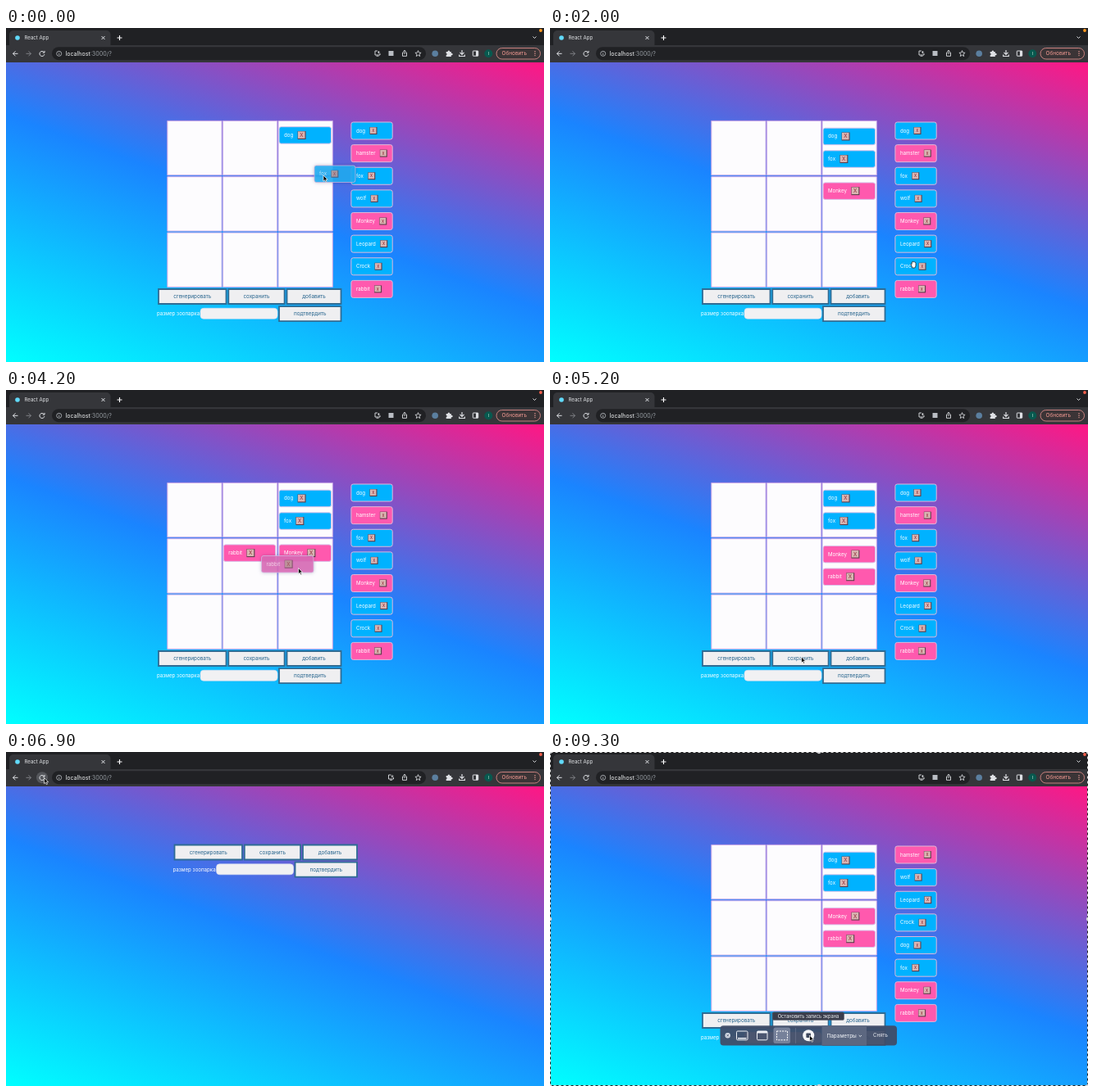
Write an HTML page with a canvas that moves like this. It is 656x408 px and loops after 9400 ms.

```html
<!DOCTYPE html>
<html lang="ru">
<head>
<meta charset="utf-8">
<title>React App</title>
<style>
  html, body { margin: 0; width: 100%; height: 100%; overflow: hidden; background: #1a84ff; }
  canvas { display: block; width: 656px; height: 408px; }
</style>
</head>
<body>
<canvas></canvas>
<script>
const W = 656, H = 408, LOOP = 9400, STEP = 100;
const canvas = document.querySelector('canvas');
const ctx = canvas.getContext('2d');
const dpr = window.devicePixelRatio || 1;
canvas.width = W * dpr;
canvas.height = H * dpr;
ctx.scale(dpr, dpr);

const BLUE = '#00b2ff', PINK = '#ff59ae', ICON = '#dfe1e5';
const pinkAnimals = ['hamster', 'Monkey', 'rabbit'];
const firstOrder = ['dog', 'hamster', 'fox', 'wolf', 'Monkey', 'Leopard', 'Crock', 'rabbit'];
const savedOrder = ['hamster', 'wolf', 'Leopard', 'Crock', 'dog', 'fox', 'Monkey', 'rabbit'];

// time, x, y, hand cursor
const path = [
  [0, 387, 180, 0], [500, 366, 158, 0], [700, 372, 165, 0],
  [1000, 441, 239, 1], [1200, 441, 239, 0], [1600, 368, 207, 0], [1700, 368, 207, 0],
  [2000, 443, 289, 1], [2200, 434, 321, 1], [2300, 420, 290, 0], [2400, 352, 180, 0],
  [2500, 352, 180, 0], [2900, 300, 206, 0], [3000, 298, 209, 1], [3200, 298, 209, 1],
  [3500, 337, 203, 0], [3700, 311, 203, 1], [3900, 316, 204, 0], [4300, 370, 222, 0],
  [4500, 370, 222, 0], [5100, 306.5, 326, 0], [5500, 306.5, 326, 0], [5700, 338, 260, 0],
  [6000, 291, 140, 0], [6100, 291, 140, 0], [6300, 29, 62, 0], [6500, 46.5, 31.5, 0],
  [7000, 46.5, 31.5, 0], [7400, 560, 170, 0], [8100, 560, 170, 0], [8500, 646, 116, 0],
  [8600, 646, 116, 0], [9200, 316.5, 346, 0], [LOOP, 316.5, 346, 0]
];

const drags = [
  { name: 'fox', from: 0, to: 600, dx: 11, dy: 12, w: 50 },
  { name: 'Monkey', from: 1200, to: 1700, dx: 21, dy: 14, w: 50 },
  { name: 'rabbit', from: 2300, to: 3000, dx: 14, dy: 14, w: 50 },
  { name: 'rabbit', from: 3900, to: 4400, dx: 45, dy: 15, w: 63.5 }
];

function box(x, y, w, h, r, fill, stroke, lineWidth = 1) {
  ctx.beginPath();
  ctx.roundRect(x, y, w, h, r);
  if (fill) { ctx.fillStyle = fill; ctx.fill(); }
  if (stroke) { ctx.strokeStyle = stroke; ctx.lineWidth = lineWidth; ctx.stroke(); }
}

function disc(x, y, r, fill) {
  ctx.beginPath();
  ctx.arc(x, y, r, 0, 7);
  ctx.fillStyle = fill;
  ctx.fill();
}

function text(str, x, y, size, color, align = 'left', weight = 400) {
  ctx.font = `${weight} ${size}px Inter, "Liberation Sans", sans-serif`;
  ctx.textAlign = align;
  ctx.textBaseline = 'middle';
  ctx.fillStyle = color;
  ctx.fillText(str, x, y);
}

// SVG path data drawn around a local origin
function glyph(x, y, d, color = ICON, lineWidth = 1, fill) {
  const shape = new Path2D(d);
  ctx.save();
  ctx.translate(x, y);
  if (fill) { ctx.fillStyle = fill; ctx.fill(shape); }
  if (color) { ctx.strokeStyle = color; ctx.lineWidth = lineWidth; ctx.stroke(shape); }
  ctx.restore();
}

function cursorAt(t) {
  const i = path.findIndex(p => p[0] > t);
  const a = path[i - 1], b = path[i];
  const k = (t - a[0]) / (b[0] - a[0]);
  return { x: a[1] + (b[1] - a[1]) * k, y: a[2] + (b[2] - a[2]) * k, hand: a[3] };
}

function background() {
  const angle = 20 * Math.PI / 180, top = 42, h = H - top;
  const half = (W * Math.sin(angle) + h * Math.cos(angle)) / 2;
  const dx = Math.sin(angle) * half, dy = Math.cos(angle) * half;
  const cx = W / 2, cy = top + h / 2;
  const g = ctx.createLinearGradient(cx - dx, cy + dy, cx + dx, cy - dy);
  g.addColorStop(0, '#00ffff');
  g.addColorStop(.5, '#1a84ff');
  g.addColorStop(1, '#ff1784');
  ctx.fillStyle = g;
  ctx.fillRect(0, top, W, h);
}

function browser(t) {
  const loading = t >= 6700 && t < 7300;
  box(0, 0, W, 42, 0, '#202124');
  box(0, 21, W, 21, 0, '#35363a');
  box(4, 3, 123.5, 22, 5, '#35363a');
  disc(14, 12, 2.8, '#61dafb');
  text('React App', 22.5, 12.2, 6.1, '#e3e5e8');
  glyph(118.5, 12, 'M-2-2L2 2M2-2L-2 2');
  glyph(138.5, 12, 'M-3 0H3M0-3V3', '#fff', 1.1);
  glyph(644.5, 11.5, 'M-2-1L0 1L2-1');
  disc(652, 3, 1.9, t < 2600 ? '#ff9a1f' : '#f4604c');

  if (t >= 6400 && t < 7100) disc(44, 31.3, 7, '#55575c');
  glyph(11.5, 31.3, 'M3 0H-3M0-3L-3 0L0 3');
  glyph(27.5, 31.3, 'M-3 0H3M0-3L3 0L0 3', '#7d7f84');
  glyph(44, 31.3, 'M2.4-1.6A3 3 0 1 0 2.9 .8M3-3.4V-1.2H.8');
  box(56, 23.2, 456, 16, 8, '#202124');
  glyph(64.7, 31.3, 'M3 0A3 3 0 1 1-3 0A3 3 0 1 1 3 0M0-.4V1.7M0-1.7V-1', '#bdc1c6', .8);
  text('localhost', 72.5, 31.4, 7.1, '#f1f3f4');
  const hostWidth = ctx.measureText('localhost').width;
  text(':3000/?', 72.5 + hostWidth, 31.4, 7.1, '#9aa0a6');

  glyph(loading ? 469.5 : 453, 31, 'M0-3H-3V2H3V0M-1.5 3.2H1.5M1.5-3V-.3M.2-1.5L1.5-.2L2.8-1.5', ICON, .9);
  if (!loading) box(466.5, 28, 6, 6, 0, '#b9bdc3');
  glyph(486, 31, 'M-1.2-1H-2.5V3.3H2.5V-1H1.2M0 1V-3.7M-1.5-2.3L0-3.8L1.5-2.3', ICON, .9);
  glyph(502.5, 31.2, 'M0-3.6L1-1.1L3.6-.9L1.6 .8L2.2 3.3L0 1.9L-2.2 3.3L-1.6 .8L-3.6-.9L-1-1.1Z', ICON, .8);
  disc(523.2, 31.2, 3.8, '#5b7f9f');
  glyph(540, 31.5, 'M-3.3-2.4H-1.2A1.2 1.2 0 1 1 1-2.4H2.8V-.4A1.2 1.2 0 1 1 2.8 1.6V3.5H-3.3V1.5A1 1 0 0 0-3.3-.5Z', null, 0, ICON);
  glyph(556, 31, 'M0-4V1.2M-2.5-1.2L0 1.4L2.5-1.2M-3.3 1.5V3.5H3.3V1.5', ICON, 1.2);
  box(569.3, 28, 6.4, 6.2, .5, null, ICON, 1);
  box(573, 28, 2.7, 6.2, 0, ICON);
  disc(588.3, 31.2, 5, '#08594f');
  text('I', 588.3, 31.5, 5, '#dfe', 'center');
  box(598, 24.5, 53.5, 13.5, 6.75, '#3b3436', '#d98a86', .9);
  text('Обновить', 604.5, 31.4, 6.45, '#f29a92');
  [-2.4, 0, 2.4].forEach(d => disc(645, 31.2 + d, .7, '#f2a49c'));
}

function card(name, x, y, w, h, inCell) {
  box(x, y, w, h, 2.5, pinkAnimals.includes(name) ? PINK : BLUE, inCell ? '#d9c4ea' : '#dfb6da', 1);
  const mid = y + h / 2;
  text(name, x + 6, mid + .2, 6.15, '#fff');
  const s = inCell ? 10 : 9;
  const bx = x + 6 + ctx.measureText(name).width + 5.4;
  box(bx, mid - s / 2, s, s, 0, '#5c3d49');
  box(bx + .4, mid - s / 2 + .4, s - 1.5, s - 1.5, 0, '#d9b5b2');
  text(inCell ? 'X' : 'x', bx + s / 2 - .3, mid, inCell ? 6.2 : 5.6, '#8c2430', 'center');
}

function cellCards(names, col, row) {
  const two = names.length > 1;
  names.forEach((name, i) => card(name, 333 + (col - 2) * 67.8,
    120.7 + row * 68.2 + (two ? 1.5 : 0) + i * 27.6, 63.5, 20.5, true));
}

function grid(t) {
  for (let i = 0; i < 9; i++)
    box(196.8 + i % 3 * 67.6, 113.4 + (i / 3 | 0) * 68.3, 66.3, 66.4, 0, '#fdfcfe', '#c9a5e6', 1);
  cellCards(t < 600 ? ['dog'] : ['dog', 'fox'], 2, 0);
  if (t >= 4400) cellCards(['Monkey', 'rabbit'], 2, 1);
  else if (t >= 1700) cellCards(['Monkey'], 2, 1);
  if (t >= 3000 && t < 4400) cellCards(['rabbit'], 1, 1);

  (t < 5300 ? firstOrder : savedOrder).forEach((name, i) =>
    card(name, 420.9, 115 + i * 27.63, 50.3, 21, false));
}

function controls(dx, dy) {
  const button = (label, x, y, w) => {
    box(x + 1, y + 1, w - 2, 18, 0, '#efeff1', '#2f6c94', 1.8);
    text(label, x + w / 2, y + 10.2, 6.3, '#23628c', 'center');
  };
  ctx.save();
  ctx.translate(dx, dy);
  button('сгенерировать', 185, 318, 84.5);
  button('сохранить', 270.3, 318, 70.3);
  button('добавить', 341.5, 318, 68);
  text('размер зоопарка', 184, 349.2, 6.15, '#fff');
  box(237, 342.3, 94, 13, 4, '#f1f1f3', '#d7dcec', .6);
  button('подтвердить', 332, 339.2, 77.5);
  ctx.restore();
}

function recorder(t) {
  ctx.lineWidth = 1;
  ctx.strokeStyle = '#222';
  ctx.strokeRect(.5, .5, W - 1, H - 1);
  ctx.setLineDash([3, 3]);
  ctx.strokeStyle = '#ddd';
  ctx.strokeRect(.5, .5, W - 1, H - 1);
  ctx.setLineDash([]);
  for (const x of [0, W / 2, W])
    for (const y of [0, H / 2, H])
      if (x !== W / 2 || y !== H / 2) disc(x, y, 2.2, '#d5d5d8');

  box(207.5, 334.3, 215.5, 24.3, 4, 'rgba(64,76,104,.94)');
  box(331.5, 334.3, 54.5, 24.3, 0, '#5c6780');
  disc(216.7, 346.3, 3.2, '#d4dae5');
  glyph(216.7, 346.3, 'M-1.2-1.2L1.2 1.2M1.2-1.2L-1.2 1.2', '#46536d', .8);
  box(227.5, 341, 13.5, 10.8, 1.3, null, '#eef1f6', 1);
  box(229, 349, 10.5, 1.5, 0, '#eef1f6');
  box(252.5, 341, 12.5, 10.8, 1.3, null, '#eef1f6', 1);
  box(252.5, 341, 12.5, 2.5, 1, '#eef1f6');
  box(272.5, 336.5, 20.5, 19.5, 2.5, '#76819a');
  ctx.setLineDash([2, 1.3]);
  box(276.5, 341, 13, 10.8, 0, null, '#fff', 1);
  ctx.setLineDash([]);
  box(299, 337, .6, 19, 0, '#6d7890');
  disc(315.2, 346.3, 7, '#f4f5f8');
  box(312.4, 343.5, 5.6, 5.6, .8, '#3d475c');
  text('Параметры', 337.5, 346.6, 6.4, '#f3f5f9');
  glyph(378.3, 346.8, 'M-1.6-.8L0 .8L1.6-.8', '#f3f5f9', .9);
  text('Снять', 394, 346.6, 6.2, '#e6e9f0');

  if (t >= 9200) {
    box(271.5, 317.8, 87, 9.6, 1.5, '#3a3d4b', '#565a68', .5);
    text('Остановить запись экрана', 315, 322.8, 5.7, '#eef0f4', 'center');
  }
}

function ghost(t, c) {
  const d = drags.find(g => t >= g.from && t < g.to);
  if (!d) return;
  ctx.save();
  ctx.globalAlpha = .65;
  ctx.shadowColor = 'rgba(0,0,60,.4)';
  ctx.shadowBlur = 4 * dpr;
  box(c.x - d.dx, c.y - d.dy, d.w, 20.5, 2.5, '#7fa8d8');
  ctx.shadowColor = 'transparent';
  card(d.name, c.x - d.dx, c.y - d.dy, d.w, 20.5, d.w > 60);
  ctx.restore();
}

function pointer({ x, y, hand }) {
  if (hand)
    glyph(x, y, 'M-3-.5Q-2.7-1.5-1.8-.5V-3Q-1.2-4-.7-3V-3.5Q0-4.3 .5-3.3Q1.3-4 1.8-2.8Q3-3 3 -1.7V1.2Q2.6 3 1.8 4H-1.2Q-1.8 2.2-3-.5Z', '#222', .8, '#fff');
  else
    glyph(x, y, 'M0 0V7.2L1.7 5.7L2.8 8.2L4 7.7L2.9 5.2H5.1Z', '#fff', .7, '#000');
}

function draw(now) {
  const t = Math.floor(now % LOOP / STEP) * STEP;
  const c = cursorAt(t);
  const empty = t >= 6700 && t < 7100;
  background();
  if (!empty) grid(t);
  controls(empty ? 19.5 : 0, empty ? -205.5 : 0);
  browser(t);
  ghost(t, c);
  if (t >= 8200) recorder(t);
  pointer(c);
}

const start = performance.now();
function tick() {
  draw(performance.now() - start);
  requestAnimationFrame(tick);
}
tick();
</script>
</body>
</html>
```
